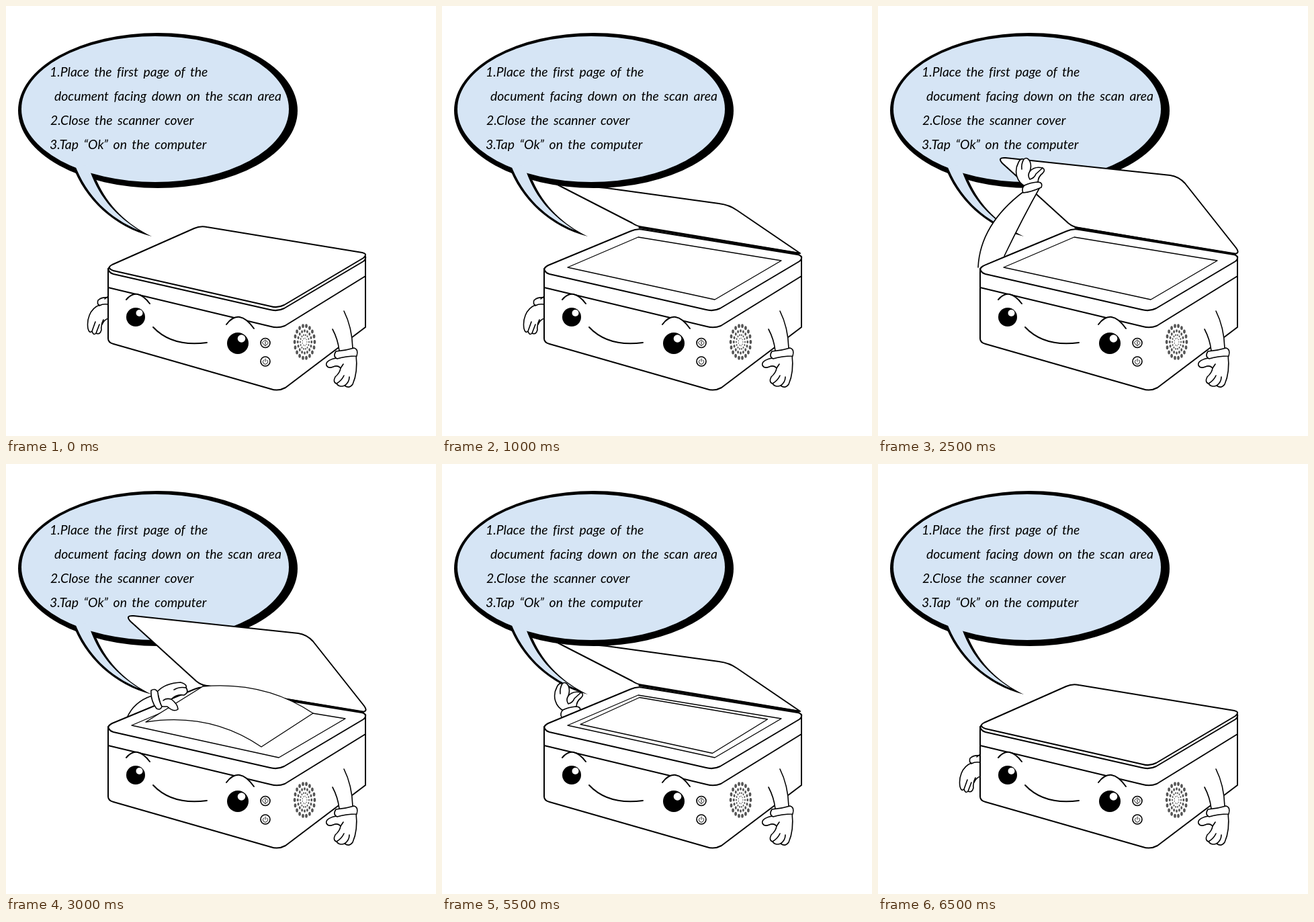
An HTML page without scripts for the animation above (8500 ms loop, 640 by 640 pixels).

```html
<!DOCTYPE html>
<html lang="en">
<head>
<meta charset="utf-8">
<title>Scanner guide</title>
<style>
  html, body { margin: 0; width: 100%; height: 100%; overflow: hidden; background: #fff; }
  svg { display: block; width: 100%; height: 100%; }
  .ink { fill: #fff; stroke: #000; stroke-width: 2; stroke-linejoin: round; stroke-linecap: round; }
  .thin { stroke-width: 1.3; }
  .hand { stroke-width: 1.6; }
  .thick { stroke-width: 3; }
  .icon { stroke-width: .9; }
  .line { fill: none; }
  .bare { stroke: none; }
  .dots { fill: none; stroke: #555; stroke-linecap: round; stroke-dasharray: 0 1; }
  text { font: italic 19.4px Lato, "Open Sans", sans-serif; word-spacing: 3px; font-variant-ligatures: none; }

  /* every pose is held, then switched */
  .pose { opacity: 0; animation: 8.5s step-end infinite; }
  .closed { animation-name: closed; }
  .ajar { animation-name: ajar; }
  .low { animation-name: low; }
  .high { animation-name: high; }
  .rest { animation-name: rest; }
  .out { animation-name: out; }
  .up { animation-name: up; }
  .curl { animation-name: curl; }
  .reach { animation-name: reach; }
  .wave { animation-name: wave; }
  .flat { animation-name: flat; }
  .nudge { animation: nudge 8.5s step-end infinite; }
  @keyframes closed { 0% { opacity: 1 } 5.88% { opacity: 0 } 76.47%, to { opacity: 1 } }
  @keyframes ajar { 0% { opacity: 0 } 5.88% { opacity: 1 } 11.76% { opacity: 0 } 70.58% { opacity: 1 } 76.47%, to { opacity: 0 } }
  @keyframes low { 0% { opacity: 0 } 11.76% { opacity: 1 } 17.64% { opacity: 0 } 64.7% { opacity: 1 } 70.58%, to { opacity: 0 } }
  @keyframes high { 0% { opacity: 0 } 17.64% { opacity: 1 } 64.7%, to { opacity: 0 } }
  @keyframes rest { 0% { opacity: 1 } 23.52% { opacity: 0 } 76.47%, to { opacity: 1 } }
  @keyframes out { 0% { opacity: 0 } 23.52% { opacity: 1 } 29.41%, to { opacity: 0 } }
  @keyframes up { 0% { opacity: 0 } 29.41% { opacity: 1 } 35.29%, to { opacity: 0 } }
  @keyframes curl { 0% { opacity: 0 } 35.29% { opacity: 1 } 41.17%, to { opacity: 0 } }
  @keyframes reach { 0% { opacity: 0 } 35.29% { opacity: 1 } 47.05%, to { opacity: 0 } }
  @keyframes wave { 0% { opacity: 0 } 47.05% { opacity: 1 } 70.58%, to { opacity: 0 } }
  @keyframes flat { 0% { opacity: 0 } 41.17% { opacity: 1 } 76.47%, to { opacity: 0 } }
  @keyframes nudge { 0% { transform: none } 41.17% { transform: translate(3px, 0) } 47.05%, to { transform: none } }
</style>
</head>
<body>
<svg viewBox="0 0 640 640">
  <defs>
    <g id="palm" class="ink hand">
      <path d="M182 368C168 361 164 345 171 332Q174 325 179 327Q184 323 188 330Q191 337 188 345Q195 337 207 340Q212 343 207 348Q200 353 200 362Z"/>
      <path class="line" d="M179 327Q175 334 176 342M188 345Q184 351 188 357Q195 355 197 349L207 340"/>
      <path d="M180 366Q175 371 178 377Q190 376 205 369Q208 361 199 361Q188 362 180 366Z"/>
    </g>
  </defs>

  <path class="ink pose low" d="M168 264L283 323Q290 328 299 329L533 368L439 304Q428 296 412 294L245 271Z"/>

  <!-- speech bubble -->
  <ellipse cx="226" cy="155.500" rx="208" ry="115.500"/>
  <path d="M99 237C117 288 162 329 217 343C180 325 152 298 135 260L124 245Z"/>
  <ellipse cx="222" cy="153.500" rx="199" ry="108.500" fill="#d6e5f5"/>
  <path fill="#d6e5f5" d="M102 235C120 284 155 316 198 334C165 313 140 287 125.500 247L122 238Z"/>
  <text x="65" y="105">1.Place the first page of the</text>
  <text x="72" y="141">document facing down on the scan area</text>
  <text x="66" y="177">2.Close the scanner cover</text>
  <text x="65" y="213">3.Tap “Ok” on the computer</text>

  <g class="pose high">
    <path class="ink" d="M190 226Q177 225 185 234L283 323Q290 329 299 330L531 369Q539 368 533 360L457 264Q448 254 435 252Z"/>
    <path class="ink line thick" d="M294 330L531 369"/>
  </g>
  <path class="ink line thick pose low" d="M294 329.500L531 368.500"/>

  <!-- limbs behind the body -->
  <path class="ink hand pose reach" d="M180 378Q190 354 217 345L228 364Z"/>
  <use href="#palm" class="pose wave"/>

  <!-- body -->
  <path class="ink" d="M152 393V495Q152 501 160 503L394 570Q405 574 416 568L535 478V375Q535 371 529 370L300 333Q290 331 281 335L158 386Q152 389 152 393Z"/>
  <path class="ink line" d="M152 391Q153 397 160 399L393 452Q404 455 414 450L532 380Q536 377 535 373M152 419L394 477Q405 480 415 476L535 402"/>
  <path class="ink thin" d="M187 389L292 344L505 379L406 437Z"/>
  <path class="ink thin pose flat" d="M206 387.500L294 347.500L484.500 380L402.500 430.500Z"/>

  <!-- face -->
  <g class="ink">
    <path d="M179 437Q195 418 214 443"/>
    <path d="M328 474Q347 449 369 480"/>
    <path class="line" d="M219 478C236 496 262 506 299 501"/>
  </g>
  <circle cx="193" cy="463" r="14"/>
  <circle cx="345" cy="502" r="16"/>
  <g fill="#fff">
    <circle cx="198.500" cy="457" r="5"/>
    <circle cx="350.500" cy="495" r="5.800"/>
  </g>

  <!-- buttons -->
  <g class="ink hand">
    <circle cx="386" cy="501.500" r="7"/>
    <circle cx="386" cy="529" r="7"/>
    <path class="line icon" d="M386 497L390.500 501.500L386 506L381.500 501.500ZM386 499V504M383.500 527A3.600 3.600 0 1 0 388.500 527M386 525V529"/>
  </g>

  <!-- speaker -->
  <g class="dots" transform="translate(444.500 500) scale(.62 1)">
    <circle r="24" pathLength="18" stroke-width="6"/>
    <circle r="16.500" pathLength="16" stroke-width="4.600"/>
    <circle r="10.500" pathLength="14" stroke-width="3"/>
    <circle r="5.500" pathLength="9" stroke-width="2"/>
  </g>

  <!-- right arm -->
  <g class="ink hand">
    <path class="bare" d="M486 481Q494 496 496 514L516 509Q516 475 503 454"/>
    <path class="line" d="M486 481Q494 496 496 513M503 454Q515 478 516 509"/>
    <path d="M493 524C484 525 475 529 477 535Q480 540 487 537Q494 534 498 539Q497 546 490 552Q486 560 492 562Q496 568 504 565Q511 570 516 563Q524 545 521 519Z"/>
    <path class="line" d="M498 539L502 533M492 562Q500 557 503 550M504 565Q511 560 511 552"/>
    <path d="M491 514Q505 513 518 509Q525 511 522 521Q506 521 493 525Q486 522 491 514Z"/>
  </g>

  <!-- left arm -->
  <g class="ink hand pose rest">
    <path class="line" d="M152 432L147 436M152 465Q146 467 143 474"/>
    <path class="bare" d="M139 445C124 451 120 468 122 480Q124 488 128 484Q130 491 134 487Q140 490 142 482Q141 474 145 467L151 464V444Z"/>
    <path class="line" d="M139 445C124 451 120 468 122 480Q124 488 128 484L133 470M128 484Q130 491 134 487L139 474M134 487Q140 490 142 482Q141 474 145 467"/>
    <path class="line" d="M151 434Q142 433 137 438Q135 443 139 446Q144 443 151 444"/>
  </g>
  <g class="pose out">
    <path class="ink hand" d="M151 436Q140 438 129 429L106 439Q124 458 151 456"/>
    <use href="#palm" x="-75" y="62"/>
  </g>
  <g class="pose up">
    <path class="ink hand" d="M149 389Q152 325 217 276L242 268Q216 314 188 372"/>
    <use href="#palm" x="38" y="-99"/>
  </g>

  <path class="ink thin pose curl" d="M208 384L293 331Q385 323 457 371L380 421Q304 369 208 384Z"/>
  <g class="pose reach">
    <g class="ink hand nudge">
      <path d="M225 339Q237 326 260 325Q270 328 268 333Q273 340 265 344Q254 342 246 350Q256 358 256 365Q250 370 240 361L231 361Z"/>
      <path class="line" d="M268 333Q258 331 250 336M246 350Q238 348 234 352"/>
      <path d="M216 337Q223 333 226 340Q227 352 232 361Q230 367 224 364Q215 352 216 337Z"/>
    </g>
  </g>

  <!-- lid over the glass -->
  <path class="ink pose ajar" d="M158 353L281 330Q290 327 299 329L530 367Q539 369 531 374L416 407Q406 413 394 410L158 364Q147 358 158 353Z"/>
  <path class="ink pose closed" d="M158 385L280 331Q289 327 299 329L530 367Q539 369 532 375L414 445Q404 450 394 447L160 394Q149 390 158 385Z"/>
</svg>
</body>
</html>
```
